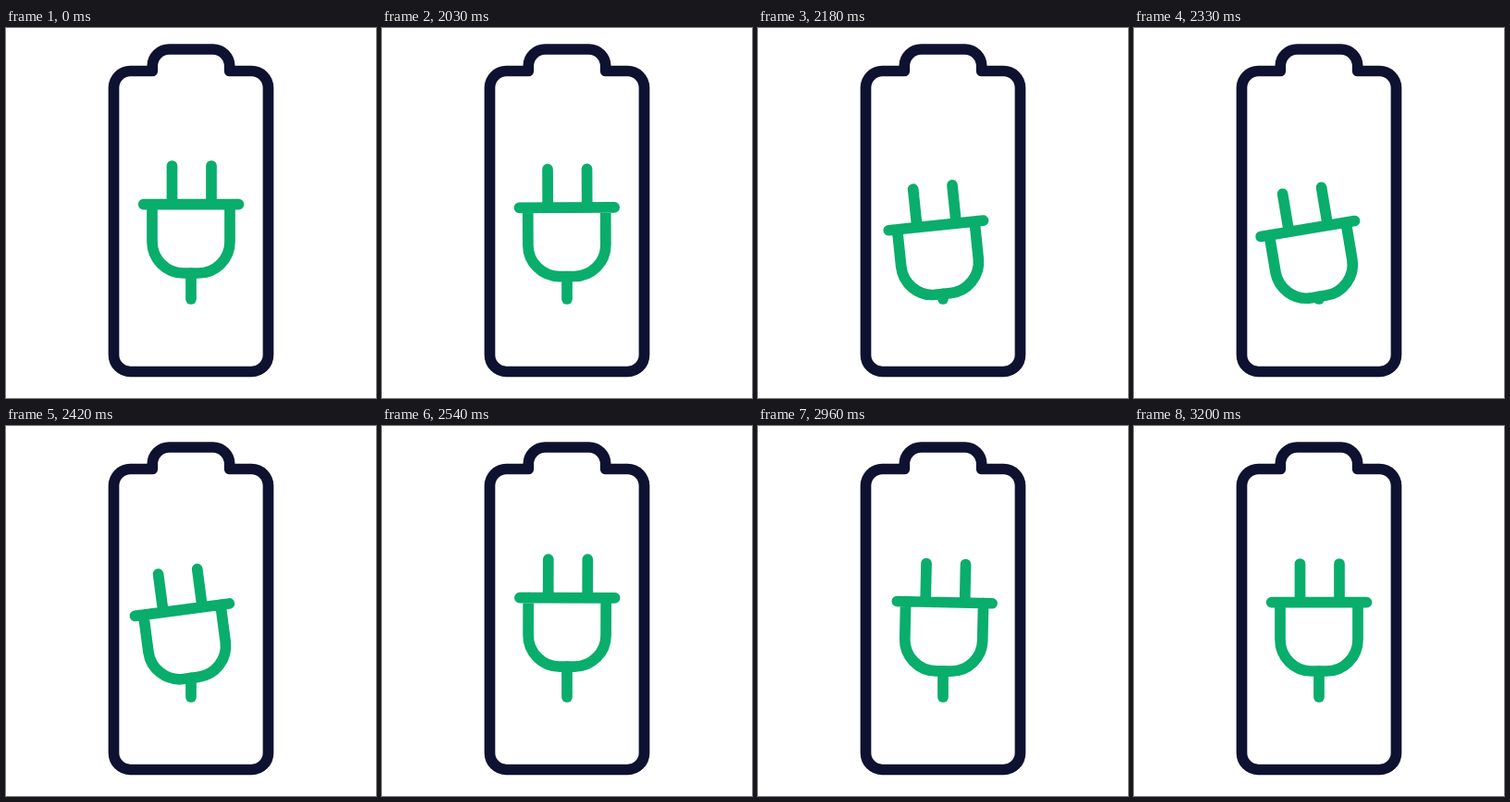
Recreate the animation shown at these times as an HTML page. Size 400x400 px, loop 3.23 s.

```html
<!DOCTYPE html>
<html lang="en">
<head>
<meta charset="utf-8">
<title>Battery plug</title>
<style>
  html, body { margin: 0; width: 100%; height: 100%; overflow: hidden; background: #fff; }
  svg { display: block; width: 100vw; height: 100vh; }
  path { fill: none; stroke-width: 11.7; stroke-linecap: round; stroke-linejoin: round; }
  .case { stroke: #0e1130; }
  .green { stroke: #09ad6c; }
</style>
</head>
<body>
<svg viewBox="0 0 400 400">
  <path class="case" d="M158.3 46.5H134.5a18 18 0 0 0-18 18V353.5a18 18 0 0 0 18 18H265.5a18 18 0 0 0 18-18V64.5a18 18 0 0 0-18-18H241.7V41a18 18 0 0 0-18-18H176.3a18 18 0 0 0-18 18Z"/>
  <path class="green" id="cord"/>
  <g id="plug">
    <path class="green" d="M148.7 190.6H251.5M179.5 149V190.6M222 149V190.6M158 190.6V231a34 34 0 0 0 34 34H208a34 34 0 0 0 34-34V190.6"/>
  </g>
</svg>
<script>
  const LOOP = 3230, START = 2000, STEP = 30;
  const plug = document.getElementById('plug');
  const cord = document.getElementById('cord');

  const soft = [0.364, 0, 0.636, 1];
  // [step, value, easing towards the next key]
  const drop = [
    [0, 0, [0.3, 0.35, 0.5, 1]],
    [10, 27, soft],
    [17, -5, soft],
    [29, 0]
  ];
  const tilt = [
    [0, 0, [0.33, 0, 0.55, 1]],
    [11.3, -9.5, soft],
    [22.5, 5.3, [0.33, 0, 0.35, 1]],
    [40, 0]
  ];

  const cubic = (a, b, t) => 3 * a * t * (1 - t) ** 2 + 3 * b * t * t * (1 - t) + t ** 3;

  function ease([x1, y1, x2, y2], u) {
    let lo = 0, hi = 1;
    for (let i = 0; i < 24; i++) {
      const mid = (lo + hi) / 2;
      if (cubic(x1, x2, mid) < u) lo = mid; else hi = mid;
    }
    return cubic(y1, y2, lo);
  }

  function valueAt(keys, k) {
    const i = keys.findIndex(key => key[0] > k);
    if (i < 0) return keys[keys.length - 1][1];
    const [k0, v0, curve] = keys[i - 1];
    const [k1, v1] = keys[i];
    return v0 + (v1 - v0) * ease(curve, (k - k0) / (k1 - k0));
  }

  function draw(now) {
    const k = Math.max(0, Math.floor((now % LOOP - START) / STEP));
    const dy = valueAt(drop, k);
    plug.setAttribute('transform', `translate(0 ${dy}) rotate(${valueAt(tilt, k)} 200 265)`);
    cord.setAttribute('d', `M200 ${265 + dy}V293`);
  }

  let first;
  function tick(now) {
    first ??= now;
    draw(now - first);
    requestAnimationFrame(tick);
  }
  draw(0);
  requestAnimationFrame(tick);
</script>
</body>
</html>
```
